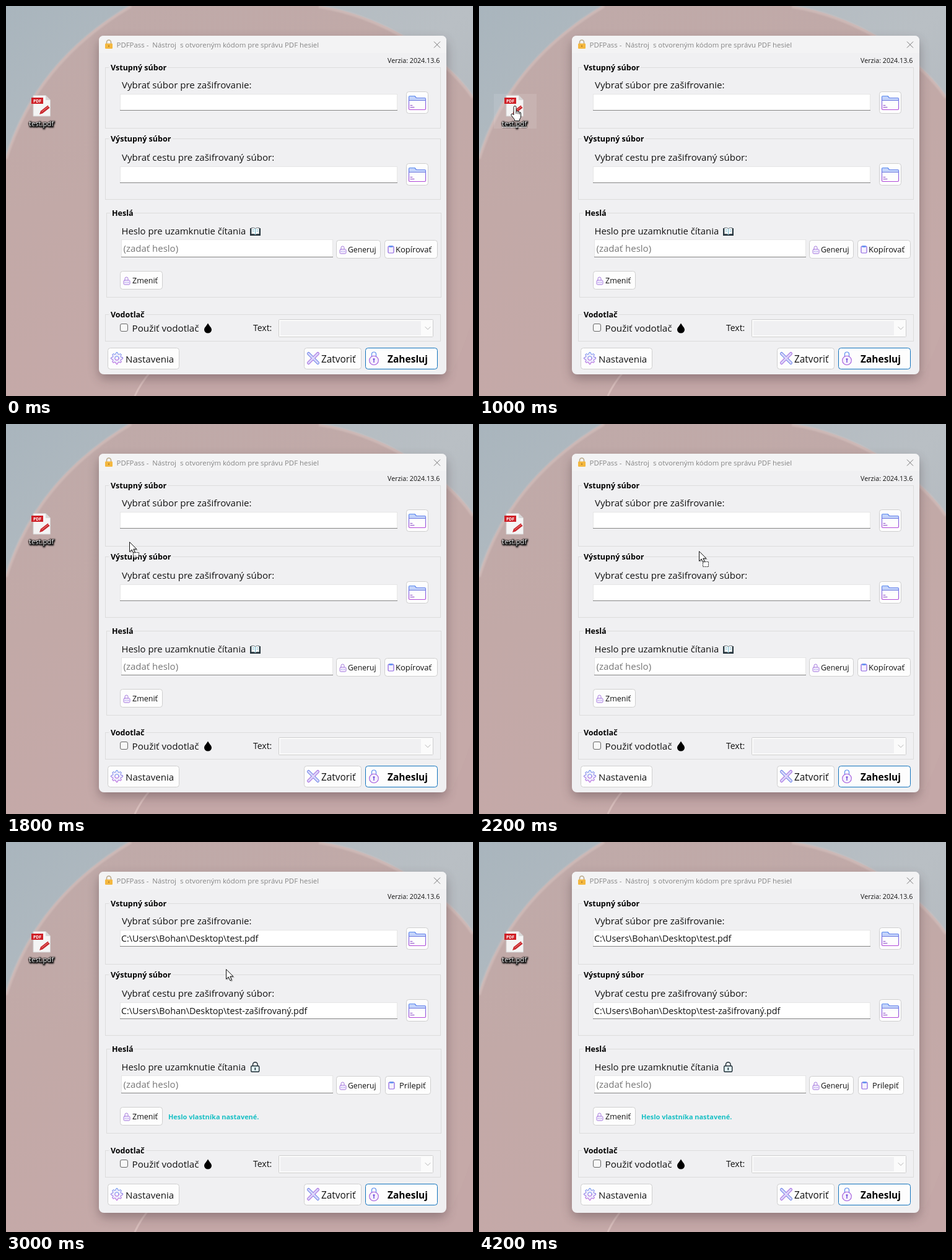
Animation, 754 px wide and 630 px high, one loop 4.6 s. Source, as an HTML page:

```html
<!DOCTYPE html>
<html lang="sk">
<head>
<meta charset="utf-8">
<title>PDFPass</title>
<style>
html, body { margin: 0; width: 100%; height: 100%; overflow: hidden; background: #b9a6a6; }
svg { display: block; }
text { font-family: "Open Sans", "Noto Sans", sans-serif; font-size: 15px; fill: #111; white-space: pre; }
.bold { font-weight: 700; font-size: 12.5px; fill: #000; }
.path { font-size: 14.3px; }
.hint { fill: #767676; }
.file { font-size: 11.2px; }
.group { fill: none; stroke: #dcdcdc; }
.btn { fill: #fdfdfd; stroke: #cfcfcf; }
.main { stroke: #1173bd; }
.line { fill: none; stroke-linecap: round; stroke-linejoin: round; }
</style>
</head>
<body>
<svg width="754" height="630" viewBox="0 0 754 630">
  <defs>
    <linearGradient id="sky" x1="0" y1="0" x2="1" y2="1">
      <stop offset="0" stop-color="#a9b5bd"/><stop offset=".5" stop-color="#b9bfc4"/><stop offset="1" stop-color="#a9b0b8"/>
    </linearGradient>
    <linearGradient id="petal" x1="0" y1="0" x2=".3" y2="1">
      <stop offset="0" stop-color="#bfaaa9"/><stop offset=".5" stop-color="#c2a9a7"/><stop offset="1" stop-color="#c5a9a8"/>
    </linearGradient>
    <linearGradient id="tint" x1="0" y1="0" x2="0" y2="1">
      <stop offset="0" stop-color="#5b8def"/><stop offset="1" stop-color="#b14ad8"/>
    </linearGradient>
    <filter id="soft" x="-20%" y="-20%" width="140%" height="140%"><feGaussianBlur stdDeviation="9"/></filter>
    <filter id="dim" x="-20%" y="-50%" width="140%" height="200%"><feGaussianBlur stdDeviation="1"/></filter>

    <g id="folder">
      <rect class="btn" x=".5" y=".5" width="35" height="35" rx="4"/>
      <path d="M5 14V9q0-1.500 1.500-1.500H14l2.500 3H30q1 0 1 1V14z" fill="#c3d3fa"/>
      <path class="line" stroke="url(#tint)" stroke-width="1.200" d="M4.500 28V9q0-1.500 1.500-1.500H14l2.500 3H30q1.500 0 1.500 1.500V28q0 1.500-1.500 1.500H6q-1.500 0-1.500-1.500z"/>
      <path class="line" stroke="#6d78df" d="M5 14.500h26"/>
      <path class="line" stroke="#8a48c8" d="M7 22.500h3M7 25.500h6"/>
    </g>
    <g id="key" class="line" stroke="#a479dd">
      <path d="M3 6V3.500a2.500 2.500 0 0 1 5 0V6"/>
      <rect x="1" y="6" width="10" height="7" rx="1.500" fill="#f3eafc"/>
      <path d="M3.500 9.500h.1M6 9.500h.1M8.500 9.500h.1" stroke="#6b6fe0"/>
    </g>
    <g id="clip" class="line" stroke="#8c62e0" stroke-width="1.200">
      <rect x="1" y="2" width="9" height="11" rx="1.500" fill="#f6f1fd"/>
      <path d="M3.500 2.500h4" stroke="#5b8def" stroke-width="2.600"/>
    </g>
    <path id="arrow" d="M.5.7V16.500L4.200 13 6.800 18.800 9.300 17.700 6.800 12.100H11.900z" stroke="#111" stroke-linejoin="round"/>
  </defs>

  <!-- wallpaper -->
  <rect width="754" height="630" fill="url(#sky)"/>
  <path d="M0 245C32 142 97 60 200 0H505C602 14 704 74 754 146V630H0z" fill="url(#petal)"/>
  <path d="M0 247C32 144 97 62 202 0M505 1C602 16 704 76 754 148" fill="none" stroke="#d5c2bf" stroke-width="5" opacity=".6" filter="url(#dim)"/>
  <path d="M208 630Q217 610 234 590H720Q745 540 754 500V630z" fill="#bfa3a3" opacity=".35"/>
  <path d="M208 630Q217 610 234 590" fill="none" stroke="#dcc4c1" stroke-width="3" opacity=".8"/>

  <!-- desktop file -->
  <rect id="hover" x="24" y="142" width="69" height="56" fill="#fff" opacity=".1"/>
  <path d="M44 144.500H64L71.500 152V178H44z" fill="#f4f4f4" stroke="#d2d0d0"/>
  <path d="M64 144.500V152H71.500z" fill="#d8d8d8"/>
  <rect x="41" y="148" width="19" height="10" fill="#cf2027"/>
  <text x="44" y="155.500" style="font-size:6.800px;font-weight:700;fill:#fff">PDF</text>
  <path d="M54 175L56 169.500 67.500 160.500 70.500 164.500 59 173.500z" fill="#c8262c"/>
  <path d="M57.500 171L69 162" stroke="#ee8b86"/>
  <text class="file" x="37.500" y="195" fill="#000" filter="url(#dim)" stroke="#000" stroke-width="2.500">test.pdf</text>
  <text class="file" x="37" y="194" style="fill:#fff">test.pdf</text>
  <path id="under" d="M37 195.500H77" stroke="#fff"/>

  <!-- window -->
  <rect id="shade" x="150" y="56" width="561" height="546" rx="9" fill="#3a2a30" opacity=".38" filter="url(#soft)"/>
  <rect id="win" x="150" y="48" width="561" height="547" rx="8" fill="#f0f0f2"/>
  <path d="M150 76V56q0-8 8-8H703q8 0 8 8V76z" fill="#f3f3f4"/>
  <path d="M162.500 61V58.500a3.500 3.500 0 0 1 7 0V61" fill="none" stroke="#b9a98a" stroke-width="1.600"/>
  <rect x="160" y="60.500" width="12" height="8.500" rx="1.200" fill="#f4b840"/>
  <path d="M166 63.500V66" stroke="#a8741f" stroke-width="1.400"/>
  <text x="178.500" y="67" style="font-size:11.430px;fill:#858585">PDFPass -&#160; Nástroj&#160; s otvoreným kódom pre správu PDF hesiel</text>
  <path d="M691 57.500L701 67.500M701 57.500L691 67.500" stroke="#777"/>
  <text x="616" y="92" style="font-size:10.700px">Verzia: 2024.13.6</text>

  <g id="groups"></g>

  <text x="187" y="133" style="font-size:15.100px">Vybrať súbor pre zašifrovanie:</text>
  <text x="187" y="250" style="font-size:15.100px">Vybrať cestu pre zašifrovaný súbor:</text>
  <text x="186.500" y="369" style="font-size:14.850px">Heslo pre uzamknutie čítania</text>
  <g id="fields"></g>
  <text class="hint" x="189.500" y="397">(zadať heslo)</text>
  <use href="#folder" x="646" y="138"/>
  <use href="#folder" x="646" y="254"/>

  <g id="buttons"></g>
  <use href="#key" x="538" y="387"/>
  <use href="#key" x="189" y="437"/>
  <text x="552" y="398" style="font-size:12.200px">Generuj</text>
  <text x="204" y="448" style="font-size:12.500px">Zmeniť</text>

  <!-- watermark row -->
  <rect x="184.500" y="513.500" width="12" height="12" rx="2.500" fill="#f8f8f8" stroke="#666"/>
  <text x="203.500" y="526" style="font-size:15.200px">Použiť vodotlač</text>
  <path d="M326 512.500C328.500 517 332 519.500 332 523a6 5.500 0 0 1-12 0C320 519.500 323.500 517 326 512.500z" fill="#000"/>
  <text x="399" y="525" style="font-size:14px">Text:</text>
  <rect x="440.500" y="506.500" width="249" height="28" rx="1" fill="#fbfbfb" stroke="#cfcfcf"/>
  <rect x="443" y="509" width="227" height="23" fill="#f0f0f2"/>
  <path class="line" d="M677 518.500L681 522.500 685 518.500" stroke="#b5b5b5"/>

  <!-- bottom row -->
  <g class="line" stroke="url(#tint)">
    <path id="gear" fill="#eeecfb"/>
    <circle cx="179" cy="569" r="3.200" fill="#fff"/>
  </g>
  <text x="193" y="576" style="font-size:15.100px">Nastavenia</text>
  <path class="line" d="M488.500 561.500L503.500 576.500" stroke="#6f86e8" stroke-width="5"/>
  <path class="line" d="M503.500 561.500L488.500 576.500" stroke="#a86de0" stroke-width="5"/>
  <path class="line" d="M488.500 561.500L503.500 576.500M503.500 561.500L488.500 576.500" stroke="#d9d6fa" stroke-width="3"/>
  <text x="509" y="576" style="font-size:15.400px">Zatvoriť</text>
  <path class="line" d="M590.500 567V562.500a3.500 3.500 0 0 1 7 0V567" stroke="#5b8def" stroke-width="1.200"/>
  <circle cx="594" cy="572.500" r="7.300" fill="#f5effd" stroke="#a35bdc" stroke-width="1.100"/>
  <path class="line" d="M594 571V575.500" stroke="#7a55dc" stroke-width="1.500"/>
  <circle cx="594" cy="570.500" r="1.500" fill="#7a55dc"/>
  <text class="bold" x="616" y="576" style="font-size:15.500px">Zahesluj</text>

  <!-- before the drop -->
  <g id="before">
    <path d="M394 359H401.500L402.500 360 403.500 359H411V371H394z" fill="#26343d"/>
    <path d="M396 358.500Q400 357.500 402.500 359.500 405 357.500 409 358.500V368.500Q405 367.500 402.500 369.500 400 367.500 396 368.500z" fill="#fff" stroke="#3c4a52" stroke-width=".8"/>
    <path d="M402.500 359.500V369.500M398 361.500H400.500M398 364H400.500M404.500 361.500H407M404.500 364H407" stroke="#6db3c8"/>
    <rect class="btn" x="611.500" y="378.500" width="85" height="29" rx="4"/>
    <use href="#clip" x="616" y="386"/>
    <text x="629" y="398" style="font-size:13px">Kopírovať</text>
  </g>

  <!-- after the drop -->
  <g id="after">
    <text class="path" x="186" y="161">C:\Users\Bohan\Desktop\test.pdf</text>
    <text class="path" x="186" y="278">C:\Users\Bohan\Desktop\test-zašifrovaný.pdf</text>
    <path class="line" d="M398.500 362V359.500a3.800 3.800 0 0 1 7.600 0V362" stroke="#1c2b33" stroke-width="1.400"/>
    <rect x="395.700" y="361.700" width="13" height="9.600" rx="1.500" fill="#e3f3f6" stroke="#1c2b33" stroke-width="1.400"/>
    <path d="M402.300 364.500V368.500" stroke="#1c2b33" stroke-width="1.700"/>
    <rect class="btn" x="612.500" y="378.500" width="73" height="29" rx="4"/>
    <use href="#clip" x="617" y="386"/>
    <text x="635" y="398" style="font-size:12.900px">Prilepiť</text>
    <text class="bold" x="262" y="448" style="font-size:10.950px;fill:#17bfc4">Heslo vlastníka nastavené.</text>
  </g>

  <!-- pointer -->
  <g id="pointer">
    <g id="plain"><use href="#arrow" x="1.500" y="1.500" opacity=".25"/><use href="#arrow" fill="#fff"/></g>
    <rect id="badge" x="6.500" y="17.500" width="9" height="8" fill="#fff" fill-opacity=".7" stroke="#222" stroke-dasharray="2 1"/>
    <path id="hand" d="M5 15V2.500a2 2 0 0 1 4 0V9q2.500-1.500 3 .8 2.200-1 2.600 1 2-.5 2 1.500V17q0 3-2 5V24.500H6.500V22.500L1.200 15.800q-1-2 .8-2.600 1.400-.3 3 1.800zM9 9V13M12 10V13.500M14.600 11V14" fill="#fff" stroke="#111" stroke-linejoin="round"/>
  </g>
</svg>
<script>
const $ = id => document.getElementById(id);
const show = (id, on) => $(id).setAttribute("visibility", on ? "inherit" : "hidden");

// title, x, y, width, height, title end
$("groups").innerHTML = [
  ["Vstupný súbor", 160, 99, 541, 98, 259],
  ["Výstupný súbor", 160, 214, 541, 98, 267],
  ["Heslá", 162, 334, 540, 136, 205],
  ["Vodotlač", 160, 498, 541, 43, 224]
].map(([name, x, y, w, h, end]) => `
  <rect class="group" x="${x + .5}" y="${y + .5}" width="${w}" height="${h}"/>
  <rect x="${x + 6}" y="${y - 2}" width="${end - x - 4}" height="5" fill="#f0f0f2"/>
  <text class="bold" x="${x + 9}" y="${y + 5}">${name}</text>`).join("");

$("fields").innerHTML = [[184, 142, 448, 27], [184, 259, 448, 27], [186, 377, 342, 29]]
  .map(([x, y, w, h]) => `
  <rect x="${x + .5}" y="${y + .5}" width="${w - 1}" height="${h - 1}" fill="#fff" stroke="#e6e6e6"/>
  <path d="M${x} ${y + h - .5}h${w}" stroke="#858585"/>`).join("");

$("buttons").innerHTML = [
  [533, 378, 72, 30], [184, 428, 69, 30], [164, 552, 116, 35], [481, 552, 93, 35], [580, 552, 117, 35, "main"]
].map(([x, y, w, h, kind = ""]) =>
  `<rect class="btn ${kind}" x="${x + .5}" y="${y + .5}" width="${w - 1}" height="${h - 1}" rx="4"/>`).join("");

const teeth = Array.from({ length: 32 }, (_, i) => {
  const a = (i - .5) * Math.PI / 16, r = i % 4 < 2 ? 9.5 : 7;
  return (179 + r * Math.cos(a)).toFixed(1) + " " + (569 + r * Math.sin(a)).toFixed(1);
});
$("gear").setAttribute("d", "M" + teeth.join("L") + "z");

const LOOP = 4600, DROP = 3000;
// time, x, y, pointer
const steps = [
  [0, 0, 0, "none"],
  [400, 40, 227, "plain"],
  [600, 45, 162, "hand"],
  [800, 56, 164, "hand"],
  [1000, 51, 161, "hand"],
  [1200, 50, 162, "hand"],
  [1400, 53, 162, "hand"],
  [1600, 58, 165, "drag"],
  [1800, 199, 190, "drag"],
  [2000, 291, 216, "drag"],
  [2200, 355, 205, "drag"],
  [2600, 355, 205, "plain"],
  [3600, 0, 0, "none"]
];

function draw(t) {
  const [, x, y, kind] = steps.findLast(s => s[0] <= t);
  const done = t >= DROP, over = kind === "hand";
  $("pointer").setAttribute("transform", `translate(${x} ${y})`);
  show("pointer", kind !== "none");
  show("plain", kind === "plain" || kind === "drag");
  show("badge", kind === "drag");
  show("hand", over);
  show("hover", over);
  show("under", over);
  show("before", !done);
  show("after", done);
  $("win").setAttribute("height", done ? 551 : 547);
  $("shade").setAttribute("height", done ? 550 : 546);
}

const start = performance.now();
function tick() {
  draw((performance.now() - start) % LOOP);
  requestAnimationFrame(tick);
}
tick();
</script>
</body>
</html>
```
